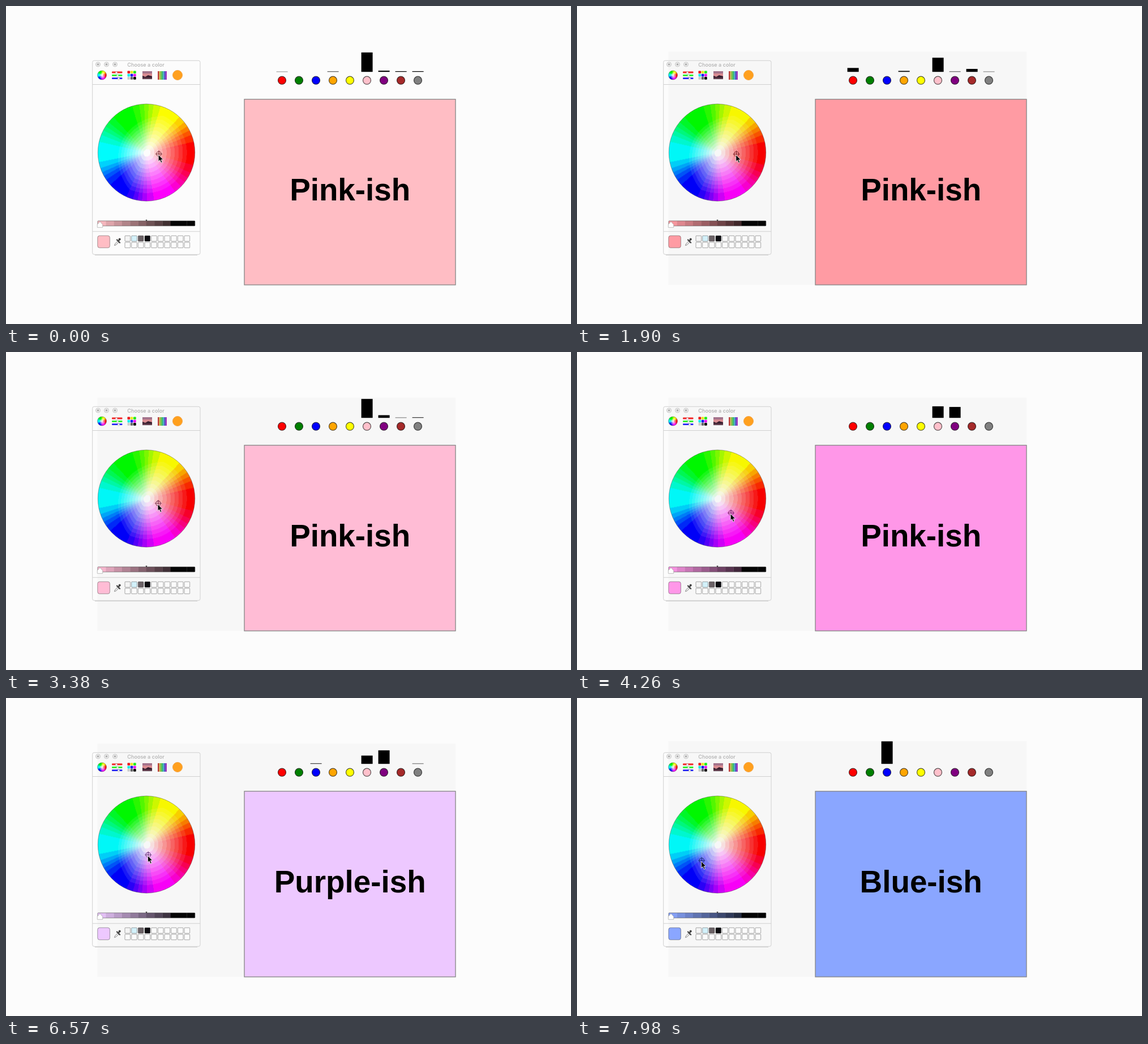
An HTML page with a canvas that plays this animation: 998x561 px, repeating every 8000 ms.

```html
<!DOCTYPE html>
<html lang="en">
<head>
<meta charset="utf-8">
<title>Colour picker</title>
<style>
html, body { margin: 0; width: 100%; height: 100%; overflow: hidden; background: #fcfcfc; }
svg, canvas { position: absolute; left: 0; top: 0; width: 998px; height: 561px; }
canvas { mix-blend-mode: multiply; }
#word { font: bold 54.8px "Liberation Sans", Arial, sans-serif; text-anchor: middle; }
#title { font: 500 9.1px Inter, "Open Sans", sans-serif; text-anchor: middle; fill: #b0b0b0; }
</style>
</head>
<body>
<svg viewBox="0 0 998 561">
  <rect id="shade" x="161.5" width="632.5" fill="#f7f7f7"/>
  <rect id="dim" x="161.5" y="164" width="260" height="264" fill="#f3f3f3"/>
  <g id="ghost"><rect x="421.5" y="91.5" width="372.5" height="74" fill="#fff"/></g>
  <g id="bars"></g>
  <g id="dots" stroke="#000" stroke-opacity=".65" stroke-width="1.2"></g>
  <rect id="panel" x="421" y="164.5" width="373" height="327.5" stroke="#858585" stroke-width="1.3"/>
  <text id="word" x="607.7" y="343"></text>

  <g fill="none" stroke="#d0d0d0">
    <path d="M157 439.5h181"/>
    <rect x="152.7" y="96.3" width="190.3" height="342" rx="3"/>
    <path d="M153 138.5h190M153 397.8h190"/>
  </g>
  <g id="lights"></g>
  <text id="title" x="247" y="106.6">Choose a color</text>

  <g id="lines"></g>
  <g id="tiles"></g>
  <rect x="241" y="115" width="17" height="14" fill="#d98c92"/>
  <path d="M241 115h17v4h-17z" fill="#a4748c"/>
  <path d="M241 123l5 2 5-3 7 2v5h-17z" fill="#3a2030"/>
  <path d="M241 127.5h17" stroke="#8d6070"/>
  <g id="pencils"></g>
  <circle cx="303" cy="122" r="8.5" fill="#ffa01e" stroke="#f5a445"/>

  <g id="ramp"></g>
  <rect x="161.8" y="379" width="172" height="9" rx="1.5" fill="none" stroke="#555" stroke-opacity=".6"/>
  <path d="M246.5 377h3l-1.5 3z" fill="#333"/>
  <path d="M166 380.5l4.7 5v5.2h-9.4v-5.2z" fill="#fff" stroke="#aaa" stroke-width=".7"/>
  <rect id="swatch" x="161.8" y="405.2" width="21.6" height="21.4" rx="3.5" stroke="#000" stroke-opacity=".35"/>
  <path d="M191.5 422.5l1-3 5-5 2 2-5 5z" fill="#e8e8e8" stroke="#777" stroke-width=".8"/>
  <path d="M196 412.5l5 5M198.5 414.5l2.5-3" stroke="#444" stroke-width="2.4" stroke-linecap="round"/>
  <circle cx="200.7" cy="411.4" r="2" fill="#444"/>
  <g id="cells" stroke="#000" stroke-opacity=".33"></g>
</svg>
<canvas id="wheel" width="998" height="561"></canvas>
<svg viewBox="0 0 998 561">
  <g id="cross" fill="none" stroke-width="1.1"><circle r="4.2"/><path d="M-6 0h12M0-6v12"/></g>
  <path id="arrow" d="M0 0v11.8l2.7-2.5 2 4.7 2.1-.9-2-4.5h3.7z" fill="#000" stroke="#fff" stroke-width=".8"/>
</svg>
<script>
const $ = id => document.getElementById(id);
const LOOP = 8000, CX = 248, CY = 258.5, R = 86;
const NAMES = ['Red', 'Green', 'Blue', 'Orange', 'Yellow', 'Pink', 'Purple', 'Brown', 'Gray'];

function add(parent, tag, attrs) {
  const el = document.createElementNS('http://www.w3.org/2000/svg', tag);
  for (const k in attrs) el.setAttribute(k, attrs[k]);
  $(parent).appendChild(el);
  return el;
}
const rect = (parent, x, y, width, height, fill, more) =>
  add(parent, 'rect', { x, y, width, height, fill, ...more });

function hsv(h, s, v = 1) {
  const ch = n => {
    const k = (n + h / 60 + 6) % 6;
    return Math.round(255 * v * (1 - s * Math.max(0, Math.min(k, 4 - k, 1))));
  };
  return [ch(5), ch(3), ch(1)];
}
const css = c => `rgb(${c.join()})`;
const mix = (a, b, p) => a + (b - a) * p;
const rad = deg => deg * Math.PI / 180;
const angle = (dx, dy) => (Math.atan2(-dy, dx) * 180 / Math.PI + 360) % 360;

// Static parts
const bars = NAMES.map((name, i) => {
  const x = 477.6 + 30 * i;
  rect('ghost', x, 92, 19.8, 24, '#f2f2f2');
  add('dots', 'circle', { cx: x + 9.9, cy: 131.2, r: 7, fill: name.toLowerCase() });
  return rect('bars', x, 116, 20, 0, '#000');
});
for (let i = 0; i < 3; i++) {
  const cx = 162.5 + 15 * i, y = 117 + 5.3 * i, tint = `hsl(${120 * i} 90% 55%)`;
  add('lights', 'circle', { cx, cy: 103, r: 4, fill: '#eee', stroke: '#bbb', 'stroke-width': .8 });
  add('lights', 'circle', { cx, cy: 103, r: 1.8, fill: '#aaa' });
  rect('lines', 187, y - 1.4, 18.5, 2.8, tint, { rx: 1 });
  add('lines', 'circle', { cx: 195 + 2 * i, cy: y + .8, r: 1.8, fill: '#fff', stroke: '#999', 'stroke-width': .5 });
}
for (let i = 0; i < 9; i++) {
  const fill = i < 6 ? `hsl(${i * 60} 85% 50%)` : `hsl(0 0% ${(8 - i) * 40}%)`;
  rect('tiles', 214.5 + i % 3 * 5.3, 114.5 + (i / 3 | 0) * 5.3, 4.6, 4.6, fill, { rx: .8 });
}
for (let i = 0; i < 7; i++)
  rect('pencils', 268.2 + i * 2.3, 115, 1.8, 15, `hsl(${i * 48} 75% 40%)`);
const filled = ['#f4f4f4', '#d3f1fa', '#6b6266', '#0c0c10'];
for (let i = 0; i < 20; i++)
  rect('cells', 210 + i % 10 * 11.67, i < 10 ? 405.3 : 416.8, 9.6, 9.8, filled[i] || '#fbfbfb', { rx: 1 });
const ramp = Array.from({ length: 12 }, (_, i) => rect('ramp', 162 + i * 14.3, 379, 14.6, 9, '#000'));

// Wheel: hue lingers at the six pure colours, and is stepped like saturation
function wheelHue(a) {
  const turned = a + 8 * Math.max(0, -Math.sin(rad(a)));
  const hue = turned - 60 / (2 * Math.PI) * .85 * Math.sin(rad(turned * 6));
  return Math.round(hue / 10) * 10;
}
function wheelSat(a, s) {
  const gain = 1.2 + .6 * Math.max(0, Math.cos(rad(a - 155)));
  return Math.min(1, Math.floor(s * gain * 10) / 10);
}
function drawWheels() {
  const size = 2 * R + 2, half = size / 2;
  const disc = document.createElement('canvas');
  disc.width = disc.height = size;
  const dc = disc.getContext('2d'), img = dc.createImageData(size, size);
  for (let y = 0; y < size; y++) for (let x = 0; x < size; x++) {
    const dx = x + .5 - half, dy = y + .5 - half, a = angle(dx, dy);
    const c = hsv(wheelHue(a), wheelSat(a, Math.hypot(dx, dy) / R));
    img.data.set([...c, 255], 4 * (y * size + x));
  }
  dc.putImageData(img, 0, 0);
  const ctx = $('wheel').getContext('2d');
  for (const [x, y, r] of [[CX, CY, R - .3], [169.5, 122, 8]]) {
    ctx.save();
    ctx.beginPath();
    ctx.arc(x, y, r, 0, 7);
    ctx.clip();
    const d = half * r / R;
    ctx.drawImage(disc, x - d, y - d, 2 * d, 2 * d);
    ctx.restore();
    ctx.strokeStyle = 'rgba(60,60,60,.5)';
    ctx.lineWidth = .8;
    ctx.stroke();
  }
}
drawWheels();

// Pointer path: time, x, y
const PATH = [
  [60, 270, 261], [1025, 290, 260.5], [1300, 290, 260.5],
  [2650, 268, 262.3], [3030, 268, 262.3],
  [4255, 272, 284], [4540, 270, 280], [5080, 270, 280],
  [5390, 269, 278], [6525, 251.3, 276.7], [7920, 220.3, 286.7]
];
function pointer(t) {
  const i = PATH.findIndex(k => k[0] > t);
  if (i < 1) return PATH.at(i).slice(1);
  const a = PATH[i - 1], b = PATH[i], p = (t - a[0]) / (b[0] - a[0]);
  return [mix(a[1], b[1], p), mix(a[2], b[2], p)];
}

// Classifier: each name has a linear score of the pointer offset; shares add up to 40 px
const SCORES = {
  Red: (x, y) => .27 * x - .15 * y - 9.95,
  Blue: x => -.38 * x - 1.56,
  Orange: (x, y) => .1 * x - .2 * y - 5.5,
  Pink: () => 0,
  Purple: (x, y) => -.07 * x + .125 * y - 1.56,
  Brown: (x, y) => .155 * x - .1 * y - 6.5,
  Gray: (x, y) => -.05 * x - .05 * y - 2.1
};
function shares(dx, dy) {
  const w = NAMES.map(n => SCORES[n] ? Math.exp(SCORES[n](dx, dy)) : 0);
  const sum = w.reduce((a, b) => a + b);
  return w.map(v => 40 * v / sum).map(h => h < .4 ? 0 : h);
}

const show = (id, on) => $(id).setAttribute('visibility', on ? 'visible' : 'hidden');
const STEP = 87.25, PHASE = 1380 % STEP;

function draw(t) {
  const [x, y] = pointer(Math.floor((t - PHASE) / STEP) * STEP + PHASE);
  const dx = x - CX, dy = y - CY, hue = angle(dx, dy), sat = Math.hypot(dx, dy) / R;
  const color = css(hsv(hue, sat)), heights = shares(dx, dy);

  const top = t < 6920 ? 80.5 : 76;
  $('shade').setAttribute('y', top);
  $('shade').setAttribute('height', 492 - top);
  show('shade', t >= 120);
  show('dim', t >= 2250 && t < 3120);
  show('ghost', t >= 940 && t < 1380);

  heights.forEach((h, i) => {
    bars[i].setAttribute('y', 116.2 - h);
    bars[i].setAttribute('height', h);
  });
  $('word').textContent = NAMES[heights.indexOf(Math.max(...heights))] + '-ish';
  $('panel').setAttribute('fill', color);
  $('swatch').setAttribute('fill', color);
  ramp.forEach((r, i) => r.setAttribute('fill', i > 8 ? '#050505' : css(hsv(hue, sat, .96 - i * .088))));

  $('cross').setAttribute('transform', `translate(${x} ${y})`);
  $('cross').setAttribute('stroke', css(hsv(hue, Math.min(1, sat + .3), .5)));
  $('arrow').setAttribute('transform', `translate(${x - .8} ${y + 1.5})`);
}

const begin = performance.now();
function tick() {
  draw((performance.now() - begin) % LOOP);
  requestAnimationFrame(tick);
}
tick();
</script>
</body>
</html>
```
